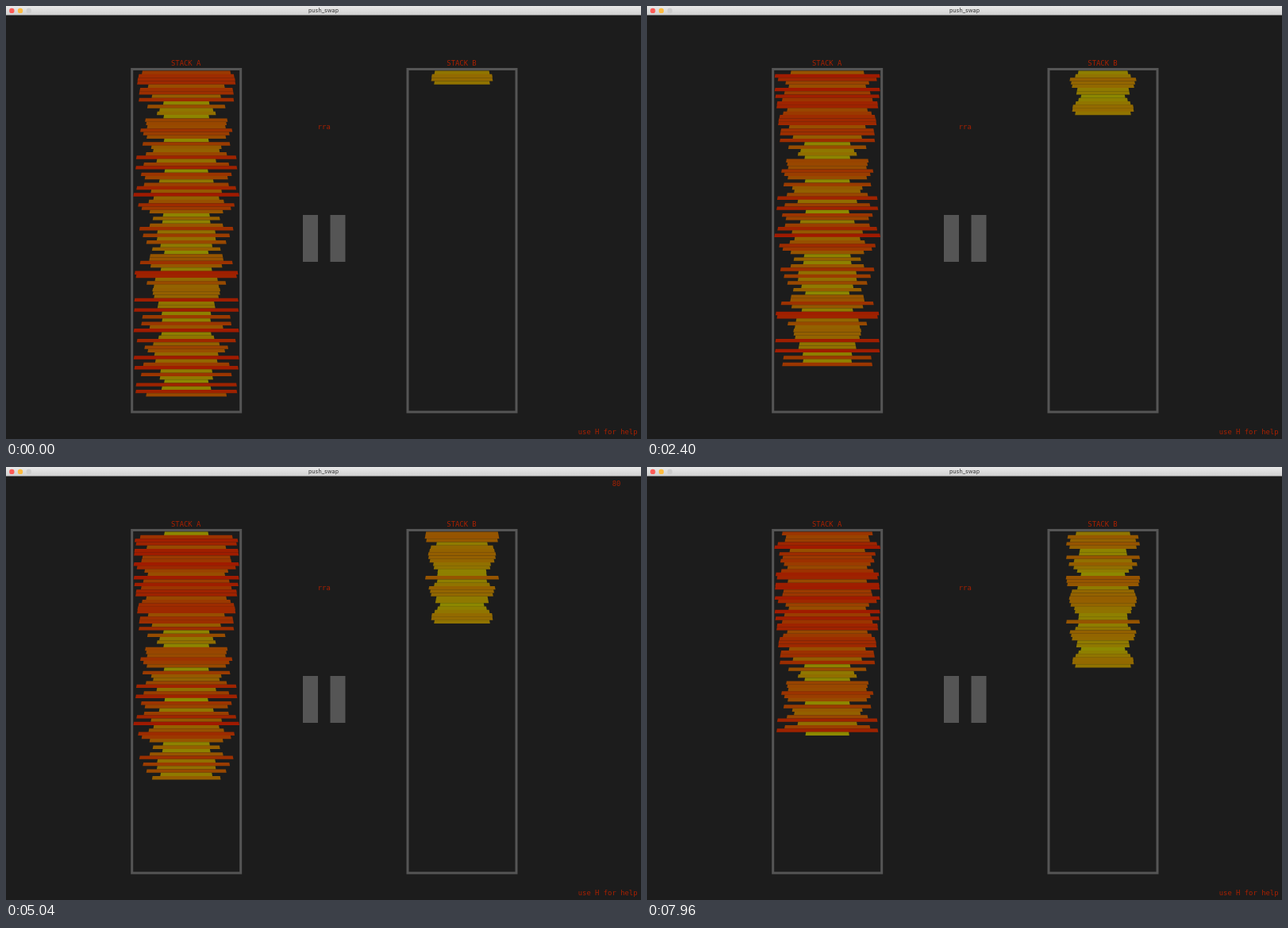
Write an HTML page with a canvas that moves like this. It is 800 px wide and 545 px high and loops after 8 s.

```html
<!DOCTYPE html>
<html lang="en">
<head>
<meta charset="utf-8">
<title>push_swap</title>
<style>
  html, body { margin: 0; width: 100%; height: 100%; overflow: hidden; background: #1c1c1c; }
  canvas { display: block; }
</style>
</head>
<body>
<canvas id="stage" width="800" height="545"></canvas>
<script>
const ctx = document.getElementById('stage').getContext('2d');

const LOOP = 8000, STEP = 40;
const TOP = 81.6, ROW = 4.27, MEDIAN = 50, FIRST_COUNT = 12;

// Starting stacks, top to bottom; each value sets a bar's width and colour.
const startA = [
  72, 83, 86, 87, 53, 79, 81, 41, 82, 5, 55, 17, 25, 4, 62, 59, 56, 77, 68, 57,
  3, 70, 43, 37, 60, 90, 26, 67, 92, 1, 75, 63, 18, 66, 89, 44, 99, 36, 51, 84,
  73, 48, 6, 38, 8, 48, 80, 24, 69, 25, 58, 14, 40, 2, 47, 49, 78, 45, 13, 95,
  91, 31, 57, 35, 39, 38, 34, 96, 21, 23, 97, 10, 71, 9, 74, 48, 98, 11, 20, 88,
  37, 64, 54, 33, 98, 30, 68, 96, 14, 75, 16, 2, 91, 10, 92, 59
];
const startB = [19, 28, 29, 20];

// Moves at which the top two of stack B are swapped.
const swaps = [37, 43, 68, 74, 78, 91];

// Pace of the solver: [step, moves done].
const pace = [[0, 0], [40, 21], [60, 30], [101, 54], [126, 68], [171, 93], [199, 108]];

const states = [{ a: startA, b: startB, op: 'rra' }];
for (let n = 0; n < 108; n++) {
  const a = states[n].a.slice(), b = states[n].b.slice();
  let op = 'rra';
  if (swaps.includes(n)) {
    op = 'sb';
    [b[0], b[1]] = [b[1], b[0]];
  } else if (a[0] < MEDIAN) {
    op = 'pb';
    b.unshift(a.shift());
  } else {
    a.unshift(a.pop());
  }
  states.push({ a, b, op });
}

function movesAt(step) {
  let i = 1;
  while (i < pace.length - 1 && step > pace[i][0]) i++;
  const [s0, m0] = pace[i - 1], [s1, m1] = pace[i];
  return Math.floor(m0 + (m1 - m0) * (step - s0) / (s1 - s0) + 0.5);
}

function rect(x, y, w, h, color) {
  ctx.fillStyle = color;
  ctx.fillRect(x, y, w, h);
}

function label(str, x, y) {
  ctx.font = '8.9px "DejaVu Sans Mono", monospace';
  ctx.textAlign = 'left';
  ctx.fillStyle = '#a82000';
  ctx.fillText(str, x, y);
}

function drawStack(values, cx) {
  ctx.strokeStyle = '#555';
  ctx.lineWidth = 3;
  ctx.strokeRect(cx - 68.5, 79.5, 137, 431.5);
  values.forEach((v, i) => {
    const half = 27 + 0.4 * v, y = TOP + i * ROW, end = y + ROW + 0.1;
    ctx.fillStyle = `rgb(${140 + 0.2 * v}, ${138 - 1.13 * v}, 0)`;
    ctx.beginPath();
    ctx.moveTo(cx - half + 0.5, y);
    ctx.lineTo(cx + half - 0.5, y);
    ctx.lineTo(cx + half + 0.3, end);
    ctx.lineTo(cx - half - 0.3, end);
    ctx.fill();
  });
}

function drawTitleBar() {
  const shade = ctx.createLinearGradient(0, 0, 0, 11.5);
  shade.addColorStop(0, '#e9e9e9');
  shade.addColorStop(1, '#d0d0d0');
  rect(0, 0, 800, 11.5, shade);
  ['#fc5b57', '#fdbc40', '#cdcdcd'].forEach((color, i) => {
    ctx.fillStyle = color;
    ctx.beginPath();
    ctx.arc(7.3 + i * 10.7, 5.9, 3.2, 0, Math.PI * 2);
    ctx.fill();
  });
  ctx.font = '7.2px Inter, sans-serif';
  ctx.textAlign = 'center';
  ctx.fillStyle = '#333';
  ctx.fillText('push_swap', 400, 8.4);
}

function draw(step) {
  const moves = movesAt(step), { a, b, op } = states[moves];
  rect(0, 0, 800, 545, '#1c1c1c');
  drawTitleBar();
  drawStack(a, 227.2);
  drawStack(b, 574.5);
  rect(374, 263, 19, 59, '#555');
  rect(408.5, 263, 19, 59, '#555');
  label('STACK A', 208, 74.5);
  label('STACK B', 555.3, 74.5);
  label(op, 392.7, 154.7);
  label('use H for help', 720.7, 539.3);
  // The move counter flickers.
  if (step * 4 % 15 >= 6) label(FIRST_COUNT + moves, 763.7, 24.3);
}

const start = performance.now();
function tick() {
  const t = (performance.now() - start) % LOOP;
  draw(Math.floor(t / STEP));
  requestAnimationFrame(tick);
}
tick();
</script>
</body>
</html>
```
